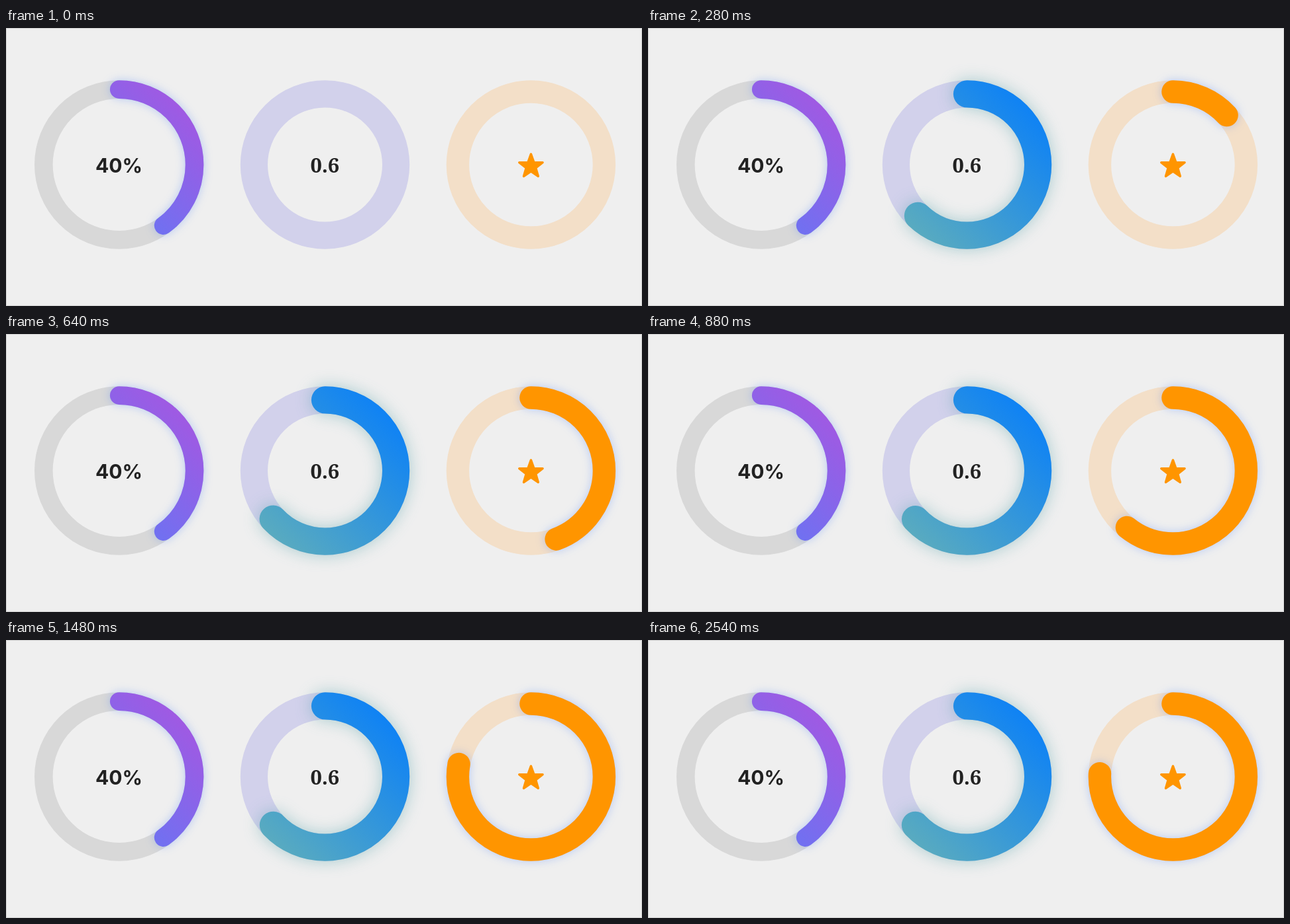
These frames come from a looping animation (960 px wide and 421 px high, 2560 ms). An HTML page:

```html
<!DOCTYPE html>
<html lang="en">
<head>
<meta charset="utf-8">
<title>Progress rings</title>
<style>
  html, body { margin: 0; width: 100%; height: 100%; overflow: hidden; background: #efefef; }
  svg { display: block; width: 960px; height: 421px; }
  .ring { fill: none; }
  .bar { stroke-linecap: round; }
  .frame { fill: #efefef; stroke: #cfcfcf; }
  text { fill: #222; text-anchor: middle; font-weight: 700; }
  .sans { font-family: Inter, "Liberation Sans", sans-serif; font-size: 30px; }
  .serif { font-family: "Noto Serif", serif; font-size: 31px; }
  .star { fill: #ff9500; stroke: #ff9500; stroke-width: 3.4; stroke-linejoin: round; }
</style>
</head>
<body>
<svg id="stage" viewBox="0 0 960 421">
  <rect class="frame" x=".5" y=".5" width="959" height="420"/>
</svg>
<script>
  const LOOP = 2560, DELAY = 13, CY = 207, OUTER = 127.7;
  const stage = document.getElementById('stage');

  const rings = [
    { cx: 170.7, width: 27.6, track: '#d8d8d8', colors: ['#af52de', '#4486fe'],
      glow: '7px rgba(30,100,255,.27)', value: 0.4 },
    { cx: 481.5, width: 41.2, track: '#d2d1eb', colors: ['#007aff', '#68b3b5'],
      glow: '12px rgba(60,150,160,.4)', value: 0.63, spring: { omega: 12.4, zeta: 0.727 } },
    { cx: 792.4, width: 34.4, track: '#f3dfc8', colors: ['#ff9500', '#ff9500'],
      glow: '7px rgba(30,100,255,.27)', value: 0.75, spring: { omega: 2.618, zeta: 0.7 } }
  ];

  function add(parent, tag, attrs, text) {
    const el = document.createElementNS('http://www.w3.org/2000/svg', tag);
    for (const key in attrs) el.setAttribute(key, attrs[key]);
    if (text) el.textContent = text;
    return parent.appendChild(el);
  }

  // Damped spring from 0 to 1, starting at rest.
  function springAt({ omega, zeta }, t) {
    const root = Math.sqrt(1 - zeta * zeta), a = omega * root * t;
    return 1 - Math.exp(-zeta * omega * t) * (Math.cos(a) + zeta / root * Math.sin(a));
  }

  function setBar(ring, value) {
    ring.bar.style.visibility = value > 0 ? 'visible' : 'hidden';
    ring.bar.setAttribute('stroke-dasharray', `${value} 2`);
  }

  function starPoints(cx, cy, outer, inner) {
    return Array.from({ length: 10 }, (_, i) => {
      const r = i % 2 ? inner : outer, a = i * Math.PI / 5;
      return `${cx + r * Math.sin(a)},${cy - r * Math.cos(a)}`;
    }).join(' ');
  }

  rings.forEach((ring, i) => {
    const { cx, width, colors } = ring, r = OUTER - width / 2;
    const grad = add(stage, 'linearGradient', {
      id: 'grad' + i, gradientUnits: 'userSpaceOnUse',
      x1: cx + OUTER, y1: CY - OUTER, x2: cx - OUTER, y2: CY + OUTER
    });
    colors.forEach((color, k) => add(grad, 'stop', { offset: k, 'stop-color': color }));
    add(stage, 'circle', { class: 'ring', cx, cy: CY, r, stroke: ring.track, 'stroke-width': width });
    ring.bar = add(stage, 'path', {
      class: 'ring bar', pathLength: 1, stroke: `url(#grad${i})`, 'stroke-width': width,
      d: `M${cx} ${CY - r}a${r} ${r} 0 0 1 0 ${2 * r}a${r} ${r} 0 0 1 0 ${-2 * r}`
    });
    ring.bar.style.filter = `drop-shadow(0 0 ${ring.glow})`;
    setBar(ring, ring.spring ? 0 : ring.value);
  });

  add(stage, 'text', { class: 'sans', x: 170.5, y: 218.5 }, '40%');
  add(stage, 'text', { class: 'serif', x: 481.3, y: 219 }, '0.6');
  add(stage, 'polygon', { class: 'star', points: starPoints(792.4, 209.5, 18.6, 7.6) });

  function draw() {
    const t = Math.max(0, performance.now() % LOOP - DELAY) / 1000;
    for (const ring of rings) {
      if (ring.spring) setBar(ring, ring.value * springAt(ring.spring, t));
    }
    requestAnimationFrame(draw);
  }
  draw();
</script>
</body>
</html>
```
